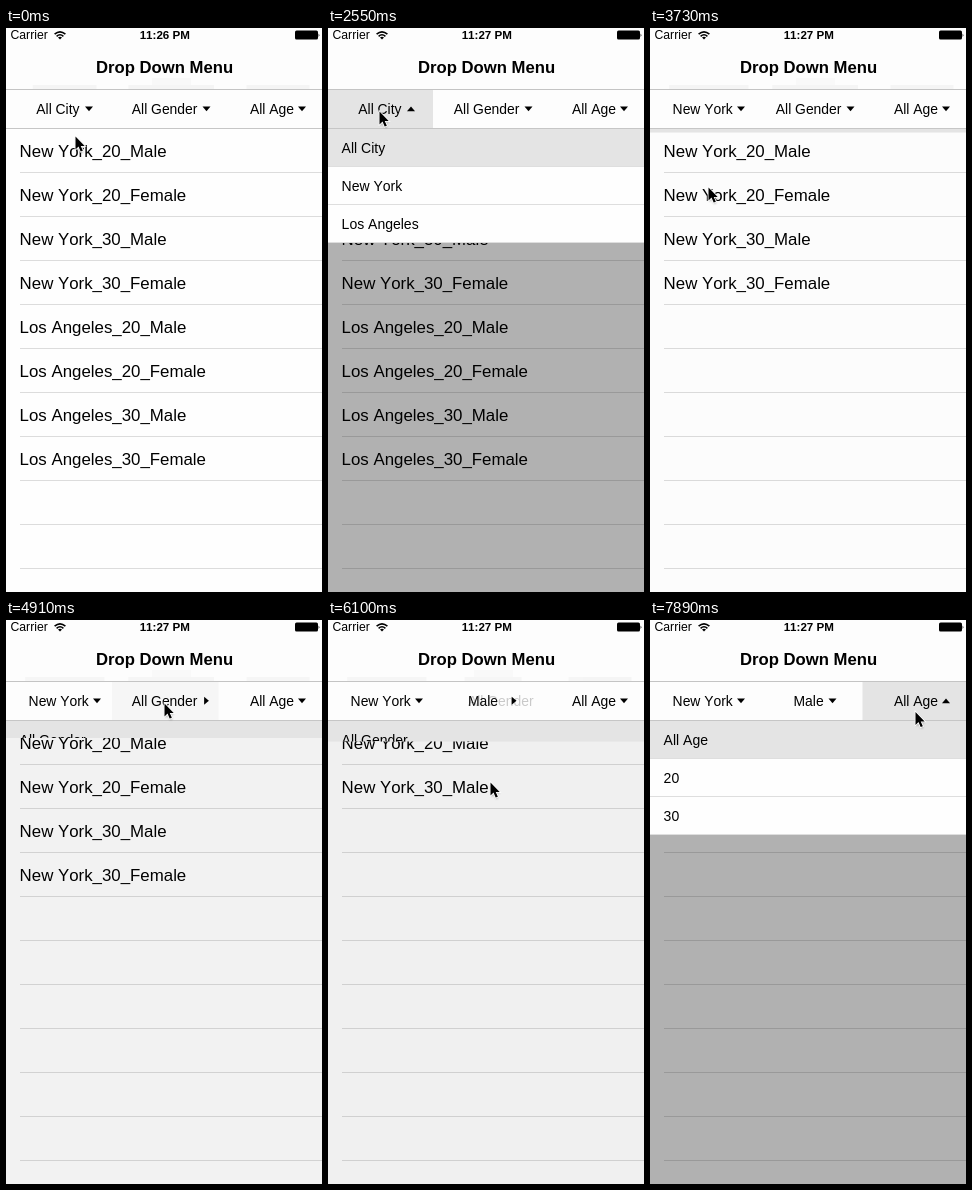
Animation of 316x564 px, one loop 8 s. Source, as an HTML page:

```html
<!DOCTYPE html>
<html lang="en">
<head>
<meta charset="utf-8">
<title>Drop Down Menu</title>
<style>
html, body { margin: 0; width: 100%; height: 100%; overflow: hidden; background: #fff; }
svg { display: block; width: 316px; height: 564px; font-family: "Liberation Sans", Arial, sans-serif; font-kerning: none; }
.list { font-size: 16.85px; }
.item { font-size: 14px; }
.label { font-size: 13.9px; }
.title { font-size: 16.7px; font-weight: bold; text-anchor: middle; }
.clock { font-size: 11.6px; font-weight: bold; text-anchor: middle; }
.carrier { font-size: 12.2px; }
</style>
</head>
<body>
<svg id="stage" viewBox="0 0 316 564">
  <defs>
    <clipPath id="drop"><rect id="dropBox" x="0" y="100" width="316" height="0"/></clipPath>
    <filter id="soft" x="-50%" y="-50%" width="200%" height="200%"><feGaussianBlur stdDeviation="1"/></filter>
  </defs>
  <rect width="316" height="564" fill="#fefefe"/>
  <g id="list"></g>
  <rect id="dim" y="100" width="316" height="464"/>
  <g id="panel" clip-path="url(#drop)"></g>
  <rect y="61" width="316" height="40" fill="#fdfdfd"/>
  <g id="bar"></g>
  <rect y="100" width="316" height="1" fill="#c6c6c6"/>
  <rect width="316" height="61" fill="#fdfdfd"/>
  <g id="ghosts" fill="#f5f5f5"><rect x="146" y="50" width="39" height="7" opacity=".6"/></g>
  <rect y="61" width="316" height="1" fill="#c4c4c4"/>
  <text class="carrier" x="4.5" y="11.4">Carrier</text>
  <g fill="none" stroke="#000" stroke-width="1.6">
    <path d="M48.6 6.2Q54 1.4 59.4 6.2M50.6 8.3Q54 5.2 57.4 8.3"/>
    <path d="M54 11.6L52 9.5Q54 7.9 56 9.5Z" fill="#000" stroke="none"/>
  </g>
  <text class="clock" id="clock" x="158.8" y="11.4"></text>
  <rect x="289" y="2.6" width="23" height="9" rx="1.6"/>
  <path d="M312.6 5.5Q314.4 7.2 312.6 9Z"/>
  <text class="title" x="158.5" y="45">Drop Down Menu</text>
  <g id="cursor">
    <path d="M0 0V14L3.3 11L5.6 16.4L8 15.4L5.7 10.2H10Z" transform="translate(.5 1.5)" opacity=".35" filter="url(#soft)"/>
    <path d="M0 0V14L3.3 11L5.6 16.4L8 15.4L5.7 10.2H10Z" stroke="#fff" stroke-width="1.8" paint-order="stroke"/>
  </g>
</svg>
<script>
const LOOP = 8000, ROW = 44, ITEM = 38, TOP = 100;
const $ = id => document.getElementById(id);

function add(parent, tag, attrs = {}, text = '') {
  const el = document.createElementNS('http://www.w3.org/2000/svg', tag);
  set(el, attrs);
  el.textContent = text;
  parent.appendChild(el);
  return el;
}
function set(el, attrs) {
  for (const k in attrs) el.setAttribute(k, attrs[k]);
}
const lerp = (a, b, k) => a + (b - a) * k;

const options = [
  ['All City', 'New York', 'Los Angeles'],
  ['All Gender', 'Male', 'Female'],
  ['All Age', '20', '30']
];
// left edge of the label, centre of the arrow
const places = {
  'All City': [30.3, 83], 'New York': [22.6, 91],
  'All Gender': [125.8, 200.5], 'Male': [143.5, 182.5],
  'All Age': [244, 296]
};
const columns = [[0, 105], [106, 106.5], [212.5, 103.5]];

// moment each choice is made, and how far its label has faded in
const picks = [
  { col: 0, t: 3590, full: 3730, mix: .3 },
  { col: 1, t: 6100, full: 6250, mix: .8 }
];

// time, column, open amount, arrow turn, column shade
const menus = [
  [0, 0, 0, 0, 0],
  [2550, 0, 1, 1, 1],
  [3590, 0, .75, .85, .5], [3730, 0, .03, 0, 0], [3880, 0, 0, 0, 0],
  [4910, 1, .15, .5, .3], [5050, 1, 1, 1, 1],
  [6100, 1, .18, .5, 0], [6250, 1, 0, 0, 0],
  [7590, 2, .4, .7, .5], [7740, 2, 1, 1, 1]
];

// first step, last step, number of steps, end position
const moves = [
  [150, 450, 3, 61.5, 101.5],
  [1350, 1950, 5, 51.5, 83.5],
  [2990, 3290, 3, 58.5, 159.5],
  [3880, 4760, 7, 158.5, 83.5],
  [5200, 5650, 4, 162.5, 162.5],
  [6250, 7000, 6, 257.5, 88],
  [7150, 7300, 2, 265.5, 90],
  [7590, 7590, 1, 265.5, 92]
];

const names = [];
for (const city of options[0].slice(1))
  for (const age of options[2].slice(1))
    for (const sex of options[1].slice(1)) names.push([city, age, sex]);

const rows = names.map((n, i) =>
  add($('list'), 'text', { class: 'list', x: 13.6, y: 129 + i * ROW }));
for (let y = TOP + ROW; y < 564; y += ROW)
  add($('list'), 'rect', { x: 14, y, width: 302, height: 1, fill: '#dcdcdc' });

const items = [0, 1, 2].map(i => {
  const y = TOP + i * ITEM;
  const back = add($('panel'), 'rect', { y: y + 1, width: 316, height: ITEM - 1 });
  add($('panel'), 'rect', { y: y + ITEM, width: 316, height: 1, fill: '#dedede' });
  return { back, text: add($('panel'), 'text', { class: 'item', x: 13.6, y: y + 25 }) };
});

const heads = columns.map(([x, width]) => ({
  back: add($('bar'), 'rect', { x, y: 62, width, height: 38, fill: '#e4e4e4' }),
  old: add($('bar'), 'text', { class: 'label', y: 86 }),
  text: add($('bar'), 'text', { class: 'label', y: 86 }),
  arrow: add($('bar'), 'path', { d: 'M-4 -2.4H4L0 2.4Z' }),
  ghost: add($('ghosts'), 'rect', { y: 57, height: 4 })
}));

function cursorAt(t) {
  let x = 69.5, y = 108.5;
  for (const [t0, t1, n, ex, ey] of moves) {
    if (t < t0) break;
    const gap = n > 1 ? (t1 - t0) / (n - 1) : 1;
    const k = Math.min(1, (Math.floor((t - t0) / gap + 1e-6) + 1) / n);
    x = lerp(x, ex, k);
    y = lerp(y, ey, k);
  }
  return [x, y];
}

function draw(t) {
  const [, open, p, turn, shade] = menus.filter(m => m[0] <= t).pop();
  const chosen = [0, 0, 0], mixes = [1, 1, 1];
  for (const pick of picks) {
    if (t < pick.t) continue;
    chosen[pick.col] = 1;
    if (t < pick.full) mixes[pick.col] = pick.mix;
  }

  const [city, sex, age] = chosen.map((c, i) => c ? options[i][c] : '');
  const shown = names.filter(n =>
    (!city || n[0] === city) && (!age || n[1] === age) && (!sex || n[2] === sex));
  rows.forEach((row, i) => row.textContent = shown[i] ? shown[i].join('_') : '');

  set($('dim'), { opacity: .305 * p });
  set($('dropBox'), { height: p ? 1 + 3 * ITEM * p : 0 });
  items.forEach((item, i) => {
    const marked = i === 0 || i === chosen[open];
    set(item.back, { fill: marked ? '#e4e4e4' : '#fefefe' });
    item.text.textContent = options[open][i];
  });

  heads.forEach((head, i) => {
    const first = options[i][0], name = options[i][chosen[i]], mix = mixes[i];
    const [x, ax] = places[first].map((v, j) => lerp(v, places[name][j], mix));
    const angle = i === open ? -180 * turn : 0;
    set(head.back, { opacity: i === open ? shade : 0 });
    head.text.textContent = name;
    head.old.textContent = mix < 1 ? first : '';
    set(head.text, { x, opacity: mix < 1 ? Math.min(1, mix * 1.2) : 1 });
    set(head.old, { x, opacity: 1 - mix });
    set(head.arrow, { transform: `translate(${ax} 80.8) rotate(${angle})` });
    set(head.ghost, { x: x - 3.5, width: ax - x + 11 });
  });
  set($('ghosts'), { opacity: 1 - p });

  $('clock').textContent = t < 750 ? '11:26 PM' : '11:27 PM';
  set($('cursor'), { transform: `translate(${cursorAt(t).join(' ')}) scale(.92)` });
}

const start = performance.now();
function tick() {
  draw((performance.now() - start) % LOOP);
  requestAnimationFrame(tick);
}
tick();
</script>
</body>
</html>
```
